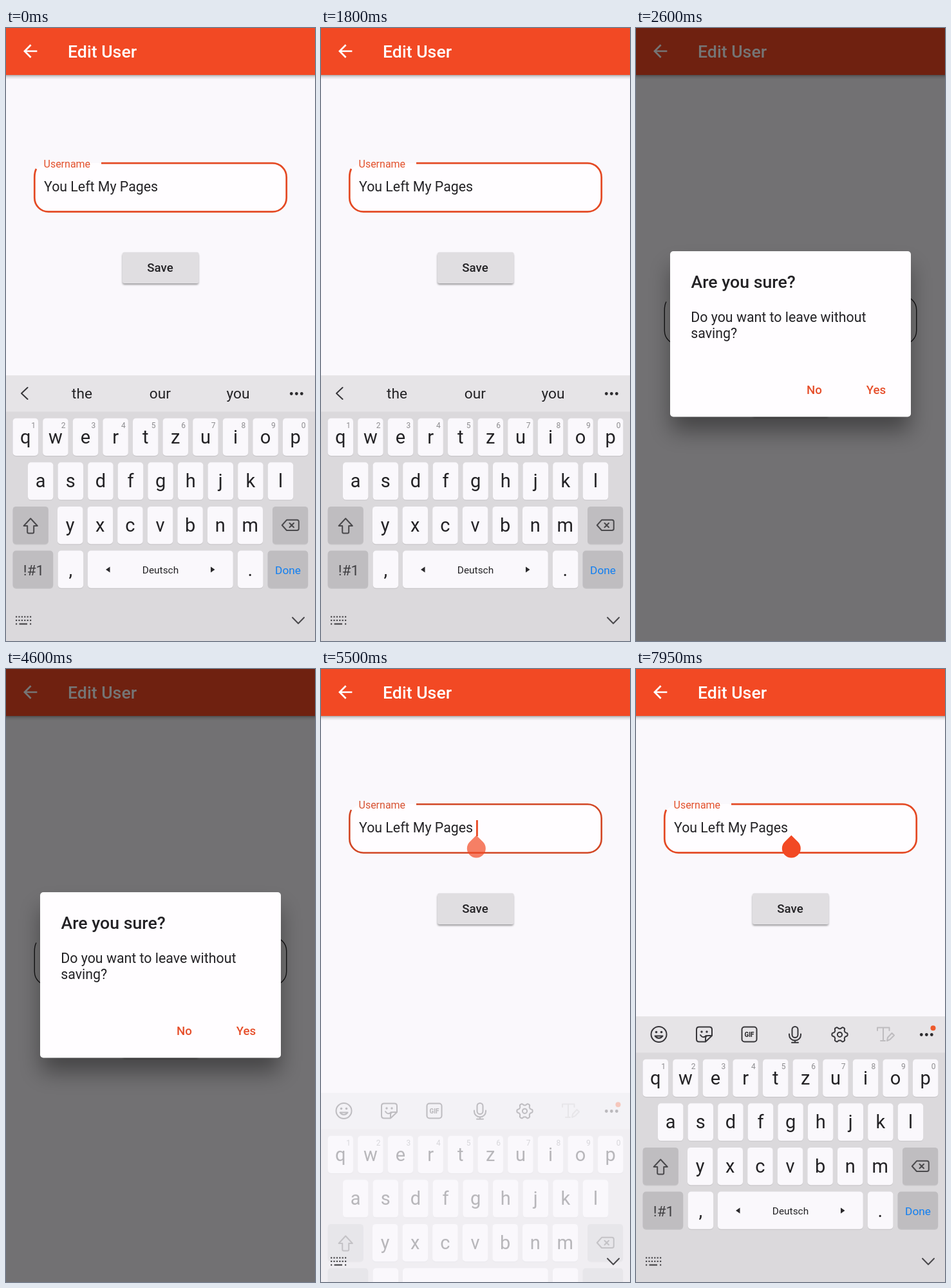
Animation, 480 px wide and 953 px high, one loop 8 s. Source, as an HTML page:

```html
<!DOCTYPE html>
<html lang="en">
<head>
<meta charset="utf-8">
<title>Edit User</title>
<style>
  html, body { margin: 0; width: 100%; height: 100%; overflow: hidden; background: #faf8fc; }
  svg { display: block; width: 100vw; height: 100vh; }
  text { font-family: Roboto, "Noto Sans", sans-serif; fill: #232225; }
  .mid { text-anchor: middle; }
  .bold { font-weight: 500; }
  .body { font-size: 21.33px; }
  .title { font-size: 26.67px; font-weight: 500; }
  .action { font-size: 18.67px; font-weight: 500; text-anchor: middle; }
  .action.hot { fill: #e64f2b; }
  .key { font-size: 29px; text-anchor: middle; }
  .digit { font-size: 12px; text-anchor: middle; fill: #8d8c8f; }
  .word { font-size: 22.7px; text-anchor: middle; }
  .line { fill: none; stroke: #37363a; stroke-width: 2; stroke-linecap: round; stroke-linejoin: round; }

  .page, .border, .label, .cursor, .handle, .dim, .dialog, .place,
  .press, .splash, .board, .words, .tools, .nav { animation: 8s linear infinite; }
  .page { animation-name: page; animation-timing-function: step-end; }
  .border { animation-name: border; fill: none; }
  .label { animation-name: label; font-size: 16px; }
  .cursor { animation-name: blink; animation-timing-function: step-end; }
  .handle { animation-name: handle; }
  .dim { animation-name: dim; }
  .dialog { animation-name: dialog; }
  .place { animation-name: place; }
  .press { animation-name: press; }
  .splash { animation-name: splash; }
  .board { animation-name: board; }
  .words { animation-name: words; animation-timing-function: step-end; }
  .tools { animation-name: tools; animation-timing-function: step-end; }
  .nav { animation-name: nav; animation-timing-function: step-end; }

  /* 1% is 80 ms */
  @keyframes page {
    0%, 68.25% { transform: none; }
    27.8% { transform: translateY(206.5px); }
  }
  @keyframes border {
    0%, 24.3%, 68.9%, 100% { stroke: #e44a24; stroke-width: 2.7px; }
    26.4%, 67.5% { stroke: #29282b; stroke-width: 1.4px; }
  }
  @keyframes label {
    0%, 24.3%, 68.9%, 100% { fill: #e2502b; }
    26.4%, 67.5% { fill: #69686b; }
  }
  @keyframes blink {
    0%, 8.1%, 20.6%, 71.85%, 84.35%, 96.2%, 100% { opacity: 0; }
    1.85%, 14.35%, 67.2%, 78.1%, 89.95% { opacity: 1; }
  }
  @keyframes handle {
    0%, 68.1% { opacity: 0; }
    68.75% { opacity: .7; }
    69.4%, 100% { opacity: 1; }
  }
  @keyframes dim {
    0%, 24.1%, 68.65%, 100% { opacity: 0; }
    24.1% { animation-timing-function: ease; }
    26.2%, 67.1% { opacity: 1; }
    67.5% { opacity: .93; }
    68.1% { opacity: .5; }
  }
  @keyframes dialog {
    0%, 24.1%, 68.65%, 100% { opacity: 0; }
    24.1% { animation-timing-function: ease-out; }
    26.2%, 66.9% { opacity: 1; }
    67.5% { opacity: .86; }
    68.1% { opacity: .35; }
  }
  @keyframes place {
    0%, 28.15% { transform: translateY(-206.5px); animation-timing-function: cubic-bezier(0, 0, .2, 1); }
    29.6%, 100% { transform: none; }
  }
  @keyframes press {
    0%, 57.45% { opacity: 0; }
    60%, 69% { opacity: 1; }
    69.1%, 100% { opacity: 0; }
  }
  @keyframes splash {
    0%, 57.45% { transform: scale(.1); }
    66.25%, 100% { transform: scale(1); }
  }
  @keyframes board {
    0%, 27.8% { transform: none; opacity: 1; }
    28.125% { transform: translateY(6px); opacity: .95; }
    28.75% { transform: translateY(45px); opacity: .6; }
    29.375% { transform: translateY(115px); opacity: .25; }
    30%, 68% { transform: translateY(170px); opacity: 0; }
    68.75% { transform: translateY(120px); opacity: .3; }
    69.375% { transform: translateY(65px); opacity: .6; }
    70% { transform: translateY(28px); opacity: .85; }
    70.625% { transform: translateY(8px); opacity: 1; }
    71.5%, 100% { transform: none; opacity: 1; }
  }
  @keyframes words { 0% { opacity: 1; } 30%, 100% { opacity: 0; } }
  @keyframes tools { 0% { opacity: 0; } 30%, 100% { opacity: 1; } }
  @keyframes nav { 0%, 67.2%, 100% { opacity: 1; } 27.8% { opacity: 0; } }
</style>
</head>
<body>
<svg viewBox="0 0 480 953" preserveAspectRatio="none">
  <defs>
    <filter id="soft" x="-30%" y="-30%" width="160%" height="160%"><feGaussianBlur stdDeviation="17"/></filter>
    <filter id="fine" x="-10%" y="-20%" width="120%" height="140%"><feGaussianBlur stdDeviation="1.6"/></filter>
    <linearGradient id="under" x2="0" y2="1">
      <stop stop-color="#000" stop-opacity=".32"/>
      <stop offset=".4" stop-color="#000" stop-opacity=".12"/>
      <stop offset="1" stop-color="#000" stop-opacity="0"/>
    </linearGradient>
    <clipPath id="noBox"><rect x="235" y="538" width="85" height="48" rx="3"/></clipPath>
  </defs>

  <rect width="480" height="953" fill="#faf8fc"/>

  <g class="page">
    <rect x="44" y="210" width="392" height="76" rx="22" fill="#fffdff"/>
    <path class="border" d="M148 210.2H414a21.7 21.7 0 0 1 21.7 21.7V264a21.7 21.7 0 0 1-21.7 21.7H66A21.7 21.7 0 0 1 44.3 264V232Q44.3 224 47 219"/>
    <text class="label" x="58.5" y="217.3">Username</text>
    <text class="body" x="59" y="254">You Left My Pages</text>
    <rect class="cursor" x="241" y="235" width="2.8" height="25" fill="#e94a24"/>
    <path class="handle" d="M241.3 258.6L251.6 268.8A14.5 14.5 0 1 1 231 268.8Z" fill="#f24924"/>
    <rect x="181" y="351" width="118" height="48" rx="3" opacity=".38" filter="url(#fine)"/>
    <rect x="181" y="348.5" width="118.5" height="48.5" rx="3" fill="#e0dee1"/>
    <text class="action" x="239.5" y="379.3">Save</text>
  </g>

  <rect y="73" width="480" height="7" fill="url(#under)"/>
  <rect width="480" height="73" fill="#f24924"/>
  <path transform="translate(21.7 20) scale(1.333)" d="M20 11H7.83l5.59-5.59L12 4l-8 8 8 8 1.41-1.41L7.83 13H20z" fill="#fff"/>
  <text class="title" x="96" y="46" style="fill:#fff">Edit User</text>

  <rect class="dim" width="480" height="953" fill="#000" fill-opacity=".54"/>

  <g class="dialog"><g class="place">
    <rect x="55" y="372" width="370" height="254" opacity=".4" filter="url(#soft)"/>
    <rect x="53" y="347" width="374" height="257.5" rx="5" fill="#fffdff"/>
    <text class="title" x="85.5" y="404.3">Are you sure?</text>
    <text class="body" x="85.3" y="456.8">Do you want to leave without</text>
    <text class="body" x="85.3" y="482.3">saving?</text>
    <g class="press" clip-path="url(#noBox)" fill="#f24924" fill-opacity=".08">
      <rect x="235" y="538" width="85" height="48"/>
      <g transform="translate(277 562)"><circle class="splash" r="52"/></g>
    </g>
    <text class="action hot" x="277" y="568.7">No</text>
    <text class="action hot" x="373" y="568.7">Yes</text>
  </g></g>

  <g class="board">
    <rect y="596" width="480" height="560" fill="#dbd9dc"/>
    <rect y="540" width="480" height="56.5" fill="#e6e4e7"/>

    <g class="words">
      <path class="line" stroke-linecap="butt" d="M33.5 559L24 568L33.5 577" stroke-width="2.4"/>
      <text class="word" x="118" y="576">the</text>
      <text class="word" x="239.3" y="576">our</text>
      <text class="word" x="360.5" y="576">you</text>
    </g>

    <g class="tools">
      <g class="line">
        <circle cx="35.5" cy="568" r="12"/>
        <path d="M29.5 570.5q6 7 12 0z"/>
        <path d="M98 556.5H114q4 0 4 4V570L108 579.5H98q-4 0-4-4V560.5q0-4 4-4ZM118 570h-6q-4 0-4 4v5.5M100 569q4 6 9 1"/>
        <rect x="164.5" y="556.5" width="23" height="23" rx="4"/>
        <rect x="242.5" y="556" width="9" height="17" rx="4.5"/>
        <path d="M238 567.5v1.5a9 8.5 0 0 0 18 0v-1.5M247 577.5v3M242 580.8h10"/>
        <path id="gear"/>
        <circle cx="316.5" cy="568.3" r="3.6"/>
        <path stroke="#bebcbf" d="M375 562v-4.5h18.500v4.500M384 557.500v20.500M380 578h7M390 578l1-5 6.500-7 3.500 3.500-6.500 6.500z"/>
      </g>
      <g fill="#37363a">
        <circle cx="31.5" cy="564.5" r="1.8"/><circle cx="39.500" cy="564.5" r="1.8"/>
        <circle cx="102" cy="564" r="1.7"/><circle cx="110" cy="564" r="1.7"/>
      </g>
      <text class="mid" x="176" y="571.6" font-size="10" font-weight="700">GIF</text>
      <circle cx="461.500" cy="558.300" r="4" fill="#ee5a2c"/>
    </g>

    <g fill="#2b2a2d">
      <circle cx="443.300" cy="568.500" r="2.400"/><circle cx="451.300" cy="568.500" r="2.400"/><circle cx="459.300" cy="568.500" r="2.400"/>
    </g>

    <g id="keys"></g>
    <g class="line" style="stroke:#4a494c">
      <path d="M38.200 762.500L48.800 774H43.200V783.500q0 2-2 2H35.200q-2 0-2-2V774H27.600Z"/>
      <path d="M436 764.800H452q2.800 0 2.800 2.800V778.200q0 2.800-2.800 2.800H436L428.800 773ZM440.500 769.700l6.500 6.500M447 769.700l-6.500 6.500"/>
    </g>
    <path d="M161.500 837.500v9l-6.500-4.500zM318 837.500v9l6.500-4.500z" fill="#2b2a2d"/>
    <text class="mid" x="240" y="847.700" font-size="15.400">Deutsch</text>
    <text class="mid" x="43" y="850.500" font-size="22.500" style="fill:#414043">!#1</text>
    <text class="mid" x="438" y="848.700" font-size="17.300" style="fill:#127ff0">Done</text>
  </g>

  <g class="nav">
    <g id="dots" fill="#49484b"></g>
    <path class="line" style="stroke:#49484b" stroke-width="2.200" d="M445 916.500L454 925.800L463 916.500"/>
  </g>
</svg>
<script>
  const SVG = 'http://www.w3.org/2000/svg';
  const keys = document.getElementById('keys');
  const dots = document.getElementById('dots');

  function add(parent, tag, attrs, text = '') {
    const el = document.createElementNS(SVG, tag);
    for (const name in attrs) el.setAttribute(name, attrs[name]);
    el.textContent = text;
    parent.append(el);
  }

  function key(x, row, width = 39.4, fill = '#faf8fc') {
    const y = 606.7 + row * 68.6;
    add(keys, 'rect', { x, y: y + 1, width, height: 58.5, rx: 5, fill: '#c9c7ca' });
    add(keys, 'rect', { x, y, width, height: 58.3, rx: 5, fill });
  }

  const rows = [['qwertzuiop', 10.6], ['asdfghjkl', 34], ['yxcvbnm', 80]];
  rows.forEach(([letters, left], row) => [...letters].forEach((letter, i) => {
    const x = left + i * 46.6;
    key(x, row);
    add(keys, 'text', { class: 'key', x: x + 19.7, y: 645.5 + row * 68.6 }, letter);
    if (!row) add(keys, 'text', { class: 'digit', x: x + 32, y: 622.3 }, (i + 1) % 10);
  }));

  const grey = '#bfbdc0';
  key(10.6, 2, 55.2, grey);
  key(414, 2, 55.2, grey);
  key(10.6, 3, 62.6, grey);
  key(80.7, 3);
  key(127, 3, 225.7);
  key(360, 3);
  key(406.6, 3, 62.6, grey);
  add(keys, 'text', { class: 'key', x: 100.3, y: 852 }, ',');
  add(keys, 'text', { class: 'key', x: 379.3, y: 852 }, '.');

  // Small keyboard symbol in the navigation bar
  const dot = (x, y, width = 2.2) => add(dots, 'rect', { x, y, width, height: 2.2 });
  for (let i = 0; i < 6; i++) {
    dot(15 + i * 4.4, 914.3);
    dot(15 + i * 4.4, 919.8);
  }
  dot(15, 925.4);
  dot(20.5, 925.4, 12.5);
  dot(37, 925.4);

  const rim = Array.from({ length: 72 }, (_, i) => {
    const a = i * Math.PI / 36;
    const r = 10.6 + 1.6 * Math.tanh(2 * Math.cos(6 * a));
    return (316.5 + r * Math.cos(a)).toFixed(1) + ' ' + (568.3 + r * Math.sin(a)).toFixed(1);
  });
  document.getElementById('gear').setAttribute('d', 'M' + rim.join('L') + 'Z');
</script>
</body>
</html>
```
